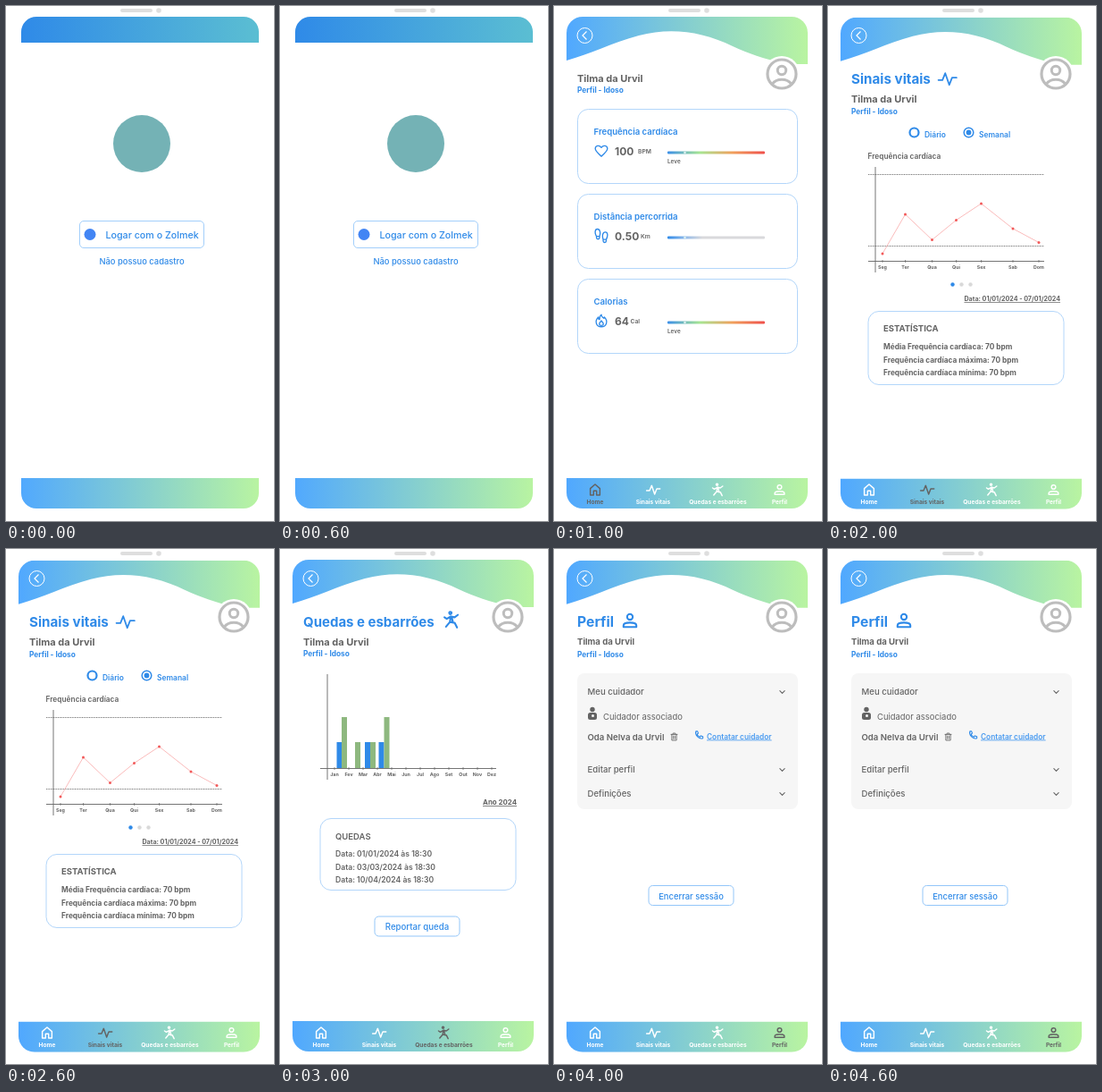
These frames come from a looping animation (300 px wide and 576 px high, 5 s). An HTML page:

```html
<!DOCTYPE html>
<html lang="pt">
<head>
<meta charset="utf-8">
<style>
html, body { margin: 0; width: 100%; height: 100%; overflow: hidden; background: #fff }
svg { display: block; width: 100vw; height: 100vh }
text { font-family: Inter, "Open Sans", sans-serif }
</style>
</head>
<body>
<svg id="stage" viewBox="0 0 300 576"></svg>
<script>
const BLUE = '#2f8ae8', GREY = '#636363', PALE = '#b3d6fa', AXIS = '#666';
const SCREEN_MS = 1000;

const text = (x, y, s, size, fill = GREY, weight = 600, extra = '') =>
  `<text x="${x}" y="${y}" font-size="${size}" fill="${fill}" font-weight="${weight}" ${extra}>${s}</text>`;
const mid = 'text-anchor="middle"';
const underEnd = 'text-anchor="end" text-decoration="underline"';
const rect = (x, y, w, h, r, fill, stroke = 'none') =>
  `<rect x="${x}" y="${y}" width="${w}" height="${h}" rx="${r}" fill="${fill}" stroke="${stroke}"/>`;
const dot = (x, y, r, fill, stroke = 'none', width = 1) =>
  `<circle cx="${x}" cy="${y}" r="${r}" fill="${fill}" stroke="${stroke}" stroke-width="${width}"/>`;
const line = (d, stroke, width = 1, extra = '') =>
  `<path d="${d}" fill="none" stroke="${stroke}" stroke-width="${width}" ${extra}/>`;
const card = (x, y, w, h) => rect(x + .5, y + .5, w - 1, h - 1, 12, '#fff', PALE);
const gradient = (id, x1, x2, ...stops) =>
  `<linearGradient id="${id}" gradientUnits="userSpaceOnUse" x1="${x1}" x2="${x2}">` +
  stops.map((c, i) => `<stop offset="${i / (stops.length - 1)}" stop-color="${c}"/>`).join('') +
  '</linearGradient>';

// Outline icons on a 24-unit grid
const ICONS = {
  home: 'M4 21V10l8-7 8 7v11h-5.5v-7h-5v7z',
  pulse: 'M1 13.5h5l3.5-8.5 5 14.5 3.5-9h5.5',
  fall: 'M9 3.5a1.5 1.5 0 1 0 3 0a1.5 1.5 0 1 0-3 0M3 9l3 2 5-3 5 1 4-3M11 8l-1 7 6 1 3 6M12 8l2 8M10 15l-5 6',
  user: 'M8.5 7.5a3.5 3.5 0 1 0 7 0a3.5 3.5 0 1 0-7 0M4 20v-2c0-4.500 16-4.500 16 0v2z',
  heart: 'M12 21C5 15 2 12 2 8.500C2 3 9 2 12 6.500C15 2 22 3 22 8.500C22 12 19 15 12 21z',
  feet: 'M4 13C1 8 1 1 5.500 1S11 7 9 13zM4 13v2a2.500 2.500 0 0 0 5 0v-2M15 18C13 12 14 6 18.500 6S23 13 20 18zM15 18v2.500a2.500 2.500 0 0 0 5 0V18',
  fire: 'M12 2c0 5 3 4 4 6 1 0 1-1 1-2 7 7 3 16-5 16S0 13 7 6c0 3 1 4 2 4 0-3 0-6 3-8zM12 12c-5 5-4 8 0 8s5-3 0-8z',
  trash: 'M4 6h16M9 5V3h6v2M6 6v15h12V6M10 10v7M14 10v7',
  phone: 'M4 3h4l2 5-3 2c1 3 4 6 7 7l2-3 5 2v4c-9 3-20-8-17-17z',
  down: 'M6 9l6 6 6-6'
};
const icon = (name, x, y, scale, color, width = 2) =>
  line(ICONS[name], color, width,
    `stroke-linejoin="round" stroke-linecap="round" transform="translate(${x} ${y}) scale(${scale}) translate(-12 -12)"`);

const TABS = [
  ['home', 46, 'Home'],
  ['pulse', 111, 'Sinais vitais'],
  ['fall', 183.5, 'Quedas e esbarrões'],
  ['user', 252.5, 'Perfil']
];

const speaker = rect(128, 3, 36, 4, 2, '#dedede') + dot(171, 5, 2.8, '#dedede');

// Shared header, avatar and tab bar
function frame(active, dy, body) {
  const tabs = TABS.map(([name, x, label], i) => {
    const color = i === active ? GREY : '#fff';
    return icon(name, x, 541, .67, color, 2.2) + text(x, 557, label, 6.6, color, 700, mid);
  }).join('');
  return `<g clip-path="url(#page)" transform="translate(0 ${dy})">
    <path fill="url(#wide)" d="M14 12H284V65C250 66 225 56 200 45C165 28 130 24 95 33C65 41 40 54 14 61z"/>
    <path fill="url(#wide)" d="M14 528H284V562H14z"/></g>` +
    dot(34.5, 33, 8.5, 'none', '#fff') + line('M36.5 28.5l-4.5 4.5 4.5 4.5', '#fff', 1.2) +
    dot(255, 76, 20, '#fff') + dot(255, 76, 16, 'none', '#bdbdbd', 3.2) +
    dot(255, 72, 4.7, 'none', '#bdbdbd', 3) + line('M244.5 87C249 80.5 261 80.5 265.5 87', '#bdbdbd', 3) +
    body + tabs;
}

const person = (y, size, subY) =>
  text(26, y, 'Tilma da Urvil', size, GREY, 700) + text(26, subY, 'Perfil - Idoso', 8.3, BLUE, 700);
const title = (s, size = 15.2) => text(26, 87, s, size, BLUE, 700);
const button = (y, label, size) =>
  rect(106, y + .5, 95, 22, 4.5, '#fff', '#93c6f9') + text(153.5, y + 15.5, label, size, BLUE, 500, mid);

function login() {
  return '<g clip-path="url(#loginPage)"><path fill="url(#top)" d="M17 12H283V41H17z"/>' +
    '<path fill="url(#wide)" d="M17 528H283V562H17z"/></g>' +
    dot(152, 154, 32, '#74b2b5') +
    rect(82.5, 240.5, 139, 30, 4.5, '#fff', '#a3cffb') + dot(94, 255.5, 6.5, '#4285f4') +
    text(111.5, 259.5, 'Logar com o Zolmek', 10.7, BLUE, 500) +
    text(152, 289, 'Não possuo cadastro', 9.4, BLUE, 500, mid);
}

function home() {
  const meters = [
    ['Frequência cardíaca', 'heart', '100', 'BPM', 94, 'heat', 'Leve'],
    ['Distância percorrida', 'feet', '0.50', 'Km', 97, 'cold', ''],
    ['Calorias', 'fire', '64', 'Cal', 85.5, 'heat', 'Leve']
  ];
  return frame(0, 0, person(85, 11, 97) + meters.map(([name, pic, value, unit, unitX, bar, level], i) => {
    const y = 115 + 95 * i;
    return card(26, y, 247, 84) + text(44.5, y + 29, name, 9.6, BLUE) +
      icon(pic, 53, y + 47, .68, BLUE) +
      text(68, y + 52, value, 12, GREY, 700) + text(unitX, y + 50, unit, 6.7) +
      rect(127, y + 47.5, 109, 3, 1, `url(#${bar})`) + dot(146.5, y + 49, 1.3, '#d9eeee') +
      text(127, y + 61, level, 6.4);
  }).join(''));
}

function vitals() {
  const days = [
    ['Seg', 61, 277], ['Ter', 86.5, 233], ['Qua', 116.5, 261.5], ['Qui', 143.5, 239.5],
    ['Sex', 171.5, 221], ['Sab', 207, 249], ['Dom', 236, 264.5]
  ];
  const stats = ['Média Frequência cardíaca', 'Frequência cardíaca máxima', 'Frequência cardíaca mínima'];
  return frame(1, .7, title('Sinais vitais') + icon('pulse', 133.5, 81.5, .9, BLUE) +
    person(108, 11, 121) +
    dot(96.5, 141.5, 5, '#fff', BLUE, 2.2) + text(108, 147, 'Diário', 8.45, BLUE) +
    dot(157.5, 141.5, 5.3, '#fff', BLUE, 1.5) + dot(157.5, 141.5, 2.9, BLUE) + text(169, 147, 'Semanal', 8.45, BLUE) +
    text(44.5, 171, 'Frequência cardíaca', 8.35) +
    line('M45 188.5H242M45 268.5H242', AXIS, .8, 'stroke-dasharray="1 .6"') +
    line('M53 180V298M45 285.5H242', AXIS, .9) +
    line('M' + days.map(d => d[1] + ' ' + d[2]).join('L'), '#fab4b4', .9) +
    days.map(([day, x, y]) => dot(x, y, 1.5, '#f25a5a') + line(`M${x} 284v3`, AXIS, .7) +
      text(x, 294, day, 5.3, GREY, 700, mid)).join('') +
    [BLUE, '#d9d9d9', '#d9d9d9'].map((c, i) => dot(139.5 + 10 * i, 311.5, 2.2, c)).join('') +
    text(260, 330, 'Data: 01/01/2024 - 07/01/2024', 7.15, GREY, 700, underEnd) +
    card(44.5, 341, 220, 83) + text(62, 364, 'ESTATÍSTICA', 9.5, GREY, 700) +
    stats.map((s, i) => text(62, 384 + 14.5 * i, s + ': 70 bpm', 8.3, GREY, 700)).join(''));
}

function falls() {
  const months = 'Jan Fev Mar Abr Mai Jun Jul Ago Set Out Nov Dez'.split(' ');
  const bars = [[63.5, 29, 0], [69, 57, 1], [84, 29, 1], [95, 29, 0], [101, 29, 1], [110.5, 29, 0], [116.5, 57, 1]];
  const dates = ['01/01', '03/03', '10/04'];
  return frame(2, 0, title('Quedas e esbarrões', 15) + icon('fall', 192, 79, .88, BLUE, 2.4) +
    person(108, 11, 120) +
    bars.map(([x, h, green]) => rect(x, 245 - h, 6, h, 0, green ? '#8eb87f' : BLUE)).join('') +
    line('M53 140V258M45 245.5H242', AXIS, .9) +
    months.map((m, i) => line(`M${61 + 16 * i} 244v3`, AXIS, .7) +
      text(61 + 16 * i, 254, m, 5.3, GREY, 700, mid)).join('') +
    text(265, 286, 'Ano 2024', 7.9, GREY, 700, underEnd) +
    card(44.5, 301, 220, 81) + text(62, 324.5, 'QUEDAS', 9.5) +
    dates.map((d, i) => text(62, 344 + 14.5 * i, `Data: ${d}/2024 às 18:30`, 8.6)).join('') +
    button(410.5, 'Reportar queda', 9.65));
}

function profile() {
  const rows = [['Meu cuidador', 163], ['Editar perfil', 250], ['Definições', 277]];
  return frame(3, .7, title('Perfil', 15.7) + icon('user', 85, 80, .9, BLUE, 2.3) +
    person(107, 9.6, 121) + rect(26, 139, 247, 152, 8, '#f6f6f6') +
    rows.map(([s, y]) => text(37.5, y, s, 9.6, GREY, 500) + icon('down', 255.5, y - 3, .44, GREY, 2.4)).join('') +
    dot(43, 179.5, 2.7, GREY) + rect(38, 183, 10, 8, 2.5, GREY) + dot(43.5, 186.5, 1.5, '#f6f6f6') +
    text(55, 190.5, 'Cuidador associado', 9.45, GREY, 400) +
    text(37.5, 213.5, 'Oda Nelva da Urvil', 9.6) + icon('trash', 134.5, 210, .44, GREY) +
    icon('phone', 162.5, 208, .46, BLUE, 2.4) +
    text(171, 212.5, 'Contatar cuidador', 8.3, '#4a9bf0', 600, 'text-decoration="underline"') +
    button(376, 'Encerrar sessão', 9.4));
}

const stage = document.getElementById('stage');
stage.innerHTML = '<defs>' +
  gradient('top', 17, 283, BLUE, '#5bbed2') +
  gradient('wide', 14, 284, '#50a8ff', '#b9f4a1') +
  gradient('heat', 127, 236, '#3b8fe8', '#a6e592', '#f0a05c', '#ef4f4a') +
  gradient('cold', 127, 166, BLUE, '#8fb9ea', '#d9d9dc') +
  `<clipPath id="page">${rect(14, 12, 270, 550, 18, '#000')}</clipPath>` +
  `<clipPath id="loginPage">${rect(17, 12, 266, 550, 17, '#000')}</clipPath></defs>` +
  speaker + [login, home, vitals, falls, profile].map(draw => `<g class="screen">${draw()}</g>`).join('');

const screens = [...document.querySelectorAll('.screen')];
const start = performance.now();
function tick() {
  const current = Math.floor((performance.now() - start) / SCREEN_MS) % screens.length;
  screens.forEach((s, i) => s.style.display = i === current ? '' : 'none');
  requestAnimationFrame(tick);
}
tick();
</script>
</body>
</html>
```
